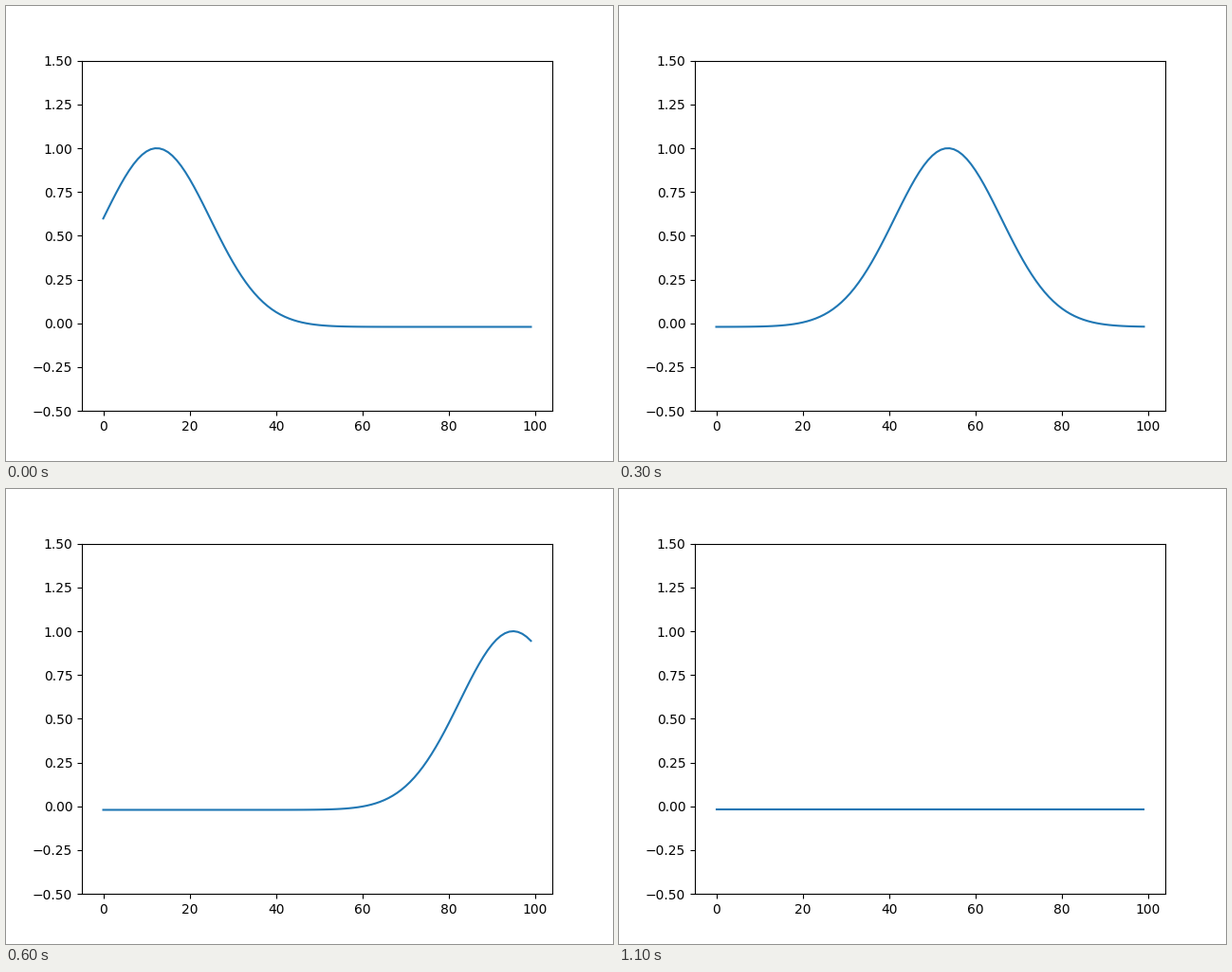
Recreate the animation shown at these times as a matplotlib script. Size 640 by 480 pixels, loop 10 s.

```python
import matplotlib.pyplot as plt
import numpy as np
from matplotlib.animation import FuncAnimation

FRAMES, INTERVAL = 100, 100
SPEED = 10 / 9      # pulse travel per frame, in standard deviations
BASE = -0.02        # level the pulse decays to

x = np.linspace(-1, 7, 100)


def pulse(i):
    return BASE + (1 - BASE) * np.exp(-(x - SPEED * i) ** 2 / 2)


fig, ax = plt.subplots(figsize=(6.4, 4.8), dpi=100)
line, = ax.plot(pulse(0))
ax.set_xlim(-4.95, 103.95)
ax.set_ylim(-0.5, 1.5)


def update(i):
    line.set_ydata(pulse(i))
    return line,


anim = FuncAnimation(fig, update, frames=FRAMES, interval=INTERVAL,
                     repeat=True, repeat_delay=0)
plt.show()
```
